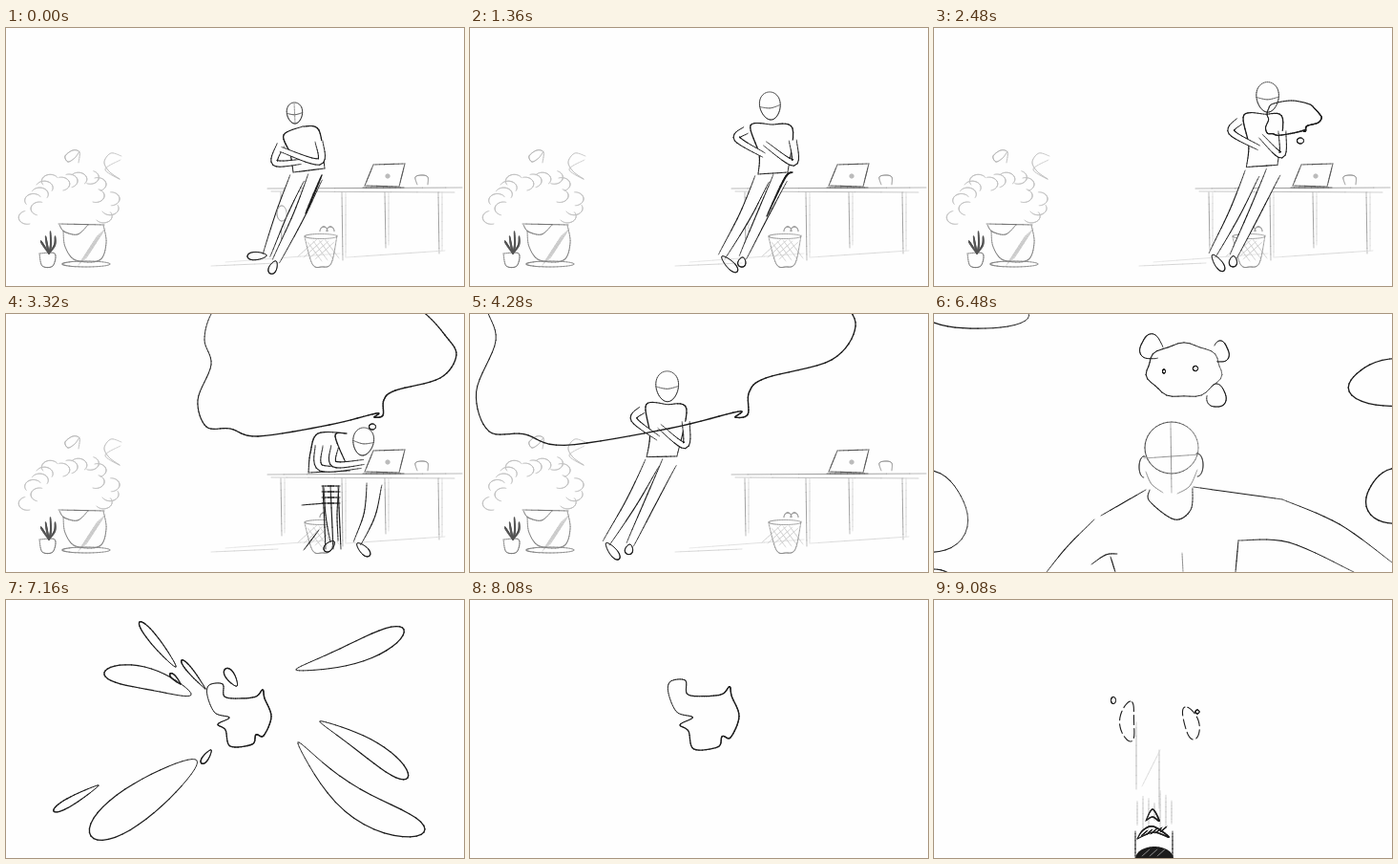
An HTML page with a canvas for the animation above (9.12 s loop, 480 by 270 pixels).

```html
<!DOCTYPE html>
<html lang="en">
<head>
<meta charset="utf-8">
<title>Thought bubble sketch</title>
<style>
html, body { margin: 0; width: 100%; height: 100%; overflow: hidden; background: #fefefe; }
canvas { display: block; width: 100vw; height: 100vh; }
</style>
</head>
<body>
<canvas id="stage"></canvas>
<script>
const LOOP = 9120, INK = '#1c1c1c', PAPER = '#fefefe', TAU = Math.PI * 2;
const canvas = document.getElementById('stage');
const ctx = canvas.getContext('2d');
const ratio = window.devicePixelRatio || 1;
canvas.width = 480 * ratio;
canvas.height = 270 * ratio;

const mix = (a, b, k) => a + (b - a) * k;
const mixPoint = (a, b, k) => [mix(a[0], b[0], k), mix(a[1], b[1], k)];
const ease = k => k * k * (3 - 2 * k);
const range = (n, fn) => Array.from({ length: n }, (_, i) => fn(i));
const random = seed => { const v = Math.sin(seed * 12.9898) * 43758.5453; return v - Math.floor(v); };
const points = text => text.trim().split(/\s+/).map(p => p.split(',').map(Number));

// Smooth line through a few points (Catmull-Rom).
function curve(pts, closed = false) {
  if (typeof pts === 'string') pts = points(pts);
  const n = pts.length, spans = closed ? n : n - 1, steps = 8;
  const at = i => closed ? pts[(i + n) % n] : pts[Math.max(0, Math.min(n - 1, i))];
  return range(spans * steps + 1, s => {
    const i = Math.min(spans - 1, Math.floor(s / steps)), f = s / steps - i;
    const [a, b, c, d] = range(4, k => at(i + k - 1));
    return [0, 1].map(k => b[k] + f / 2 * (c[k] - a[k] + f * (2 * a[k] - 5 * b[k] + 4 * c[k] - d[k]
      + f * (3 * (b[k] - c[k]) + d[k] - a[k]))));
  });
}
// Ellipse or arc, optionally with a wavy edge.
const oval = (x, y, rx, ry, from = 0, to = TAU, wave = 0, lobes = 5) => range(41, i => {
  const a = mix(from, to, i / 40), k = 1 + wave * Math.sin(lobes * a);
  return [x + rx * k * Math.cos(a), y + ry * k * Math.sin(a)];
});
// Drop shape between two points, r0 wide at the first and r1 at the second.
function drop(x0, y0, x1, y1, r0, r1, bend = 0) {
  const len = Math.hypot(x1 - x0, y1 - y0), nx = (y0 - y1) / len, ny = (x1 - x0) / len;
  return range(41, i => {
    const a = i / 40 * TAU, s = (1 - Math.cos(a)) / 2;
    const off = bend * Math.sin(Math.PI * s) + Math.sin(a) * mix(r0, r1, s);
    return [mix(x0, x1, s) + nx * off, mix(y0, y1, s) + ny * off];
  });
}
const zoom = (line, s, cx, cy, dx = 0, dy = 0) => line.map(([x, y]) => [cx + (x - cx) * s + dx, cy + (y - cy) * s + dy]);
const shift = (line, dx, dy = 0) => zoom(line, 1, 0, 0, dx, dy);

function fill(line, color = PAPER) {
  ctx.fillStyle = color;
  ctx.beginPath();
  line.forEach(p => ctx.lineTo(...p));
  ctx.fill();
}
// A pen line that thins out at both ends.
function pen(line, color = INK, width = 1) {
  ctx.strokeStyle = color;
  for (let i = 1; i < line.length; i++) {
    ctx.lineWidth = width * (.6 + .5 * Math.sin(Math.PI * i / line.length));
    ctx.beginPath();
    ctx.moveTo(...line[i - 1]);
    ctx.lineTo(...line[i]);
    ctx.stroke();
  }
}
const seg = (x0, y0, x1, y1, color, width) => pen(curve([[x0, y0], [x1, y1]]), color, width);
const hatch = (n, x, y, stepX, stepY, dx, dy, color, width) => range(n, i =>
  seg(x + i * stepX, y + i * stepY, x + i * stepX + dx, y + i * stepY + dy, color, width));

function track(keys, t, lerp = mix) {
  const i = keys.findIndex(k => k[0] > t);
  if (i < 0) return keys[keys.length - 1][1];
  if (i === 0) return keys[0][1];
  const [t0, a] = keys[i - 1], [t1, b] = keys[i];
  return lerp(a, b, ease((t - t0) / (t1 - t0)));
}

// Room
function desk() {
  seg(274, 168, 478, 167, '#9c9c9c', .9);
  seg(278, 171, 470, 172, '#b4b4b4', .8);
  for (const [x, foot] of [[288, 232], [352, 243], [397, 230], [453, 236]]) {
    seg(x, 172, x + 1, foot, '#a0a0a0', .9);
    seg(x + 4, 172, x + 4, foot - 3, '#cfcfcf', .8);
  }
  seg(215, 249, 285, 246, '#cfcfcf', .8);
  seg(230, 245, 350, 236, '#ddd', .8);
  seg(357, 240, 460, 233, '#d4d4d4', .8);
}
function basket() {
  hatch(4, 316, 224, 6, -1, 15, 20, '#c4c4c4', .7);
  hatch(4, 344, 224, -6, -1, -20, 18, '#c4c4c4', .7);
  pen(oval(330, 218, 17, 2.5), '#999', .8);
  pen(curve('313,219 321,247 331,250 341,246 347,217'), '#8a8a8a', .9);
  range(2, i => pen(oval(333 + i * 7, 213, 4, 5, Math.PI, TAU), '#999', .8));
}
function plant() {
  range(15, i => {
    const a = Math.PI * (.93 + 1.14 * i / 14), reach = 30 + 16 * random(i + 1), turn = random(i + 7) * 2;
    pen(oval(66 + reach * Math.cos(a), 190 + reach * .85 * Math.sin(a), 9, 7, a + turn - 2, a + turn + 1.2), '#c2c2c2', .9);
  });
  pen(curve('76,141 77,130 70,128 62,134 65,140 72,136 77,129'), '#b4b4b4', .9);
  pen(curve('121,134 110,131 103,140 108,150 119,158 104,148 120,138'), '#c2c2c2', .9);
  hatch(5, 104, 210, -2, 7 / 4, -20, 31, '#bbb', .7);
  seg(55, 205, 103, 206, '#777', 1);
  pen(curve('56,206 61,213 75,216 86,206'), '#858585', 1);
  pen(curve('60,212 62,229 73,243 98,243 105,225 102,206'), '#858585', 1);
  pen(oval(84, 247, 25, 3), '#888', 1);
  pen(curve([[35, 236], [38, 249], [49, 249], [51, 236], [35, 236]]), '#777', .9);
  range(4, i => pen(curve([[45, 236], [45 + (i - 1.5) * 4, 227], [44 + (i - 1.5) * 5, 213 + 5 * Math.abs(i - 2)]]), '#555', 2));
}
function deskTop() {
  const screen = points('376,165 385,143 418,142 412,166 376,165');
  fill(screen);
  range(4, i => seg(...screen[i], ...screen[i + 1], '#555', 1));
  seg(374, 167, 417, 167, '#555', 1);
  fill(oval(400, 155, 2.6, 2.6), '#bbb');
  pen(curve('431,164 429,156 436,154 442,156 442,164'), '#999', .9);
}

// Figure: a small set of joints, dressed with limb outlines.
const JOINTS = ['crown', 'chin', 'neck', 'shoulderL', 'back', 'waistL', 'elbowL', 'handL', 'shoulderR', 'waistR', 'elbowR', 'handR',
  'hipL', 'kneeL', 'ankleL', 'toeL', 'hipR', 'kneeR', 'ankleR', 'toeR'];
const lean = points(`302,78 303,100 311,103 291,112 298,132 301,151 282,141 309,140 328,107 334,147 328,140 288,127
  305,157 289,194 273,238 253,239 324,156 307,196 283,244 277,257`);
const arms = points(`313,67 316,96 316,101 294,102 303,132 302,153 280,116 308,133 338,105 333,151 339,141 309,121
  306,158 288,197 264,239 280,255 325,157 306,197 286,240 284,250`);
const sit = points(`376,119 373,148 357,125 327,125 319,145 317,166 330,161 372,159 345,128 360,164 344,157 375,155
  341,181 341,210 344,238 334,248 386,178 381,210 368,240 381,253`);
const slump = points(`216,224 212,256 212,215 190,198 142,202 124,231 217,222 215,252 205,221 165,257 198,238 207,254
  166,250 137,245 108,245 97,249 166,256 178,255 187,253 192,251`);
const leanIn = lean.map(([x, y]) => [x + (250 - y) * .012, y - (250 - y) * .008]);
const stand = arms.map(([x, y]) => [x + (250 - y) * .07, 255 - (255 - y) * 1.1]);
const poses = [[0, lean], [120, lean], [1000, leanIn], [1320, arms], [1400, arms], [1920, stand], [2320, shift(stand, 20)],
  [2880, sit], [3400, sit], [4200, shift(stand, -120, 2)], [4760, slump]];

function limb(joints, wide, narrow) {
  const spine = curve(joints), end = spine.length - 1;
  const side = sign => spine.map(([x, y], i) => {
    const a = spine[Math.max(0, i - 1)], b = spine[Math.min(end, i + 1)];
    const len = Math.hypot(b[0] - a[0], b[1] - a[1]) || 1, w = sign * mix(wide, narrow, i / end) / len;
    return [x - (b[1] - a[1]) * w, y + (b[0] - a[0]) * w];
  });
  const left = side(1), right = side(-1);
  fill([...left, ...right.slice().reverse()]);
  pen(left);
  pen(right);
}
function figure(t) {
  const pose = track(poses, t, (a, b, k) => a.map((p, i) => mixPoint(p, b[i], k)));
  const j = Object.fromEntries(JOINTS.map((name, i) => [name, pose[i]]));
  for (const s of ['R', 'L']) {
    limb([j['hip' + s], j['knee' + s], j['ankle' + s]], 8, 4);
    pen(drop(...j['ankle' + s], ...j['toe' + s], 3, 5));
  }
  const left = curve([j.neck, j.shoulderL, j.back, j.waistL]), right = curve([j.neck, j.shoulderR, j.waistR]);
  fill([...left, ...right.slice().reverse()]);
  pen(left, INK, 1.2);
  pen(right, INK, 1.2);
  if (t < 4400) pen(curve([j.waistL, j.waistR]));
  for (const s of ['L', 'R']) limb([mixPoint(j['shoulder' + s], j['elbow' + s], .35), j['elbow' + s], j['hand' + s]], 4, 2.5);
  const size = Math.hypot(j.chin[0] - j.crown[0], j.chin[1] - j.crown[1]) * .38;
  const head = drop(...j.crown, ...j.chin, size * 1.1, size * .85);
  fill(head);
  pen(head, '#333', .9);
  pen(curve([head[10], mixPoint(j.crown, j.chin, .58), head[30]]), '#555', .7);
  if (t < 1080) {
    pen(curve([j.crown, j.chin]), '#888', .7);
    pen(oval(...j.kneeL, 5, 8), '#999', .7);
    pen(shift(curve([j.hipR, j.kneeR]), 7, -2), INK, 1.8);
  } else if (t < 1480) {
    pen(shift(curve([j.waistR, j.hipR, j.kneeR]), 5), INK, 1.9);
  } else if (t >= 2880 && t < 3480) {
    hatch(4, 331, 180, 0, 6, 19, 0, INK, 1.2);
    hatch(3, 332, 180, 8, 0, 3, 66, INK, 1.1);
    seg(310, 200, 334, 198);
    seg(328, 226, 312, 247);
  }
}

// Thought bubble and its burst
const bubble = curve(`215,0 208,27 215,53 201,90 210,118 235,120 264,128 339,116 388,104 386,108 395,106 396,90 408,80 455,67 472,43
  460,22 440,0 410,-24 325,-40 235,-24`, true);
const bubbleScale = [[2240, .04], [2880, .8], [3280, 1], [3400, 1], [3840, 1.35], [4760, 1.6], [5120, 3]];
const bubbleDrift = [[3400, 0], [4760, -150]];
const crescent = drop(199, 56, 288, 4, 2, 6, -7);

function thought(t) {
  if (t >= 2240 && t < 5120) {
    pen(zoom(bubble, track(bubbleScale, t), 388, 108, track(bubbleDrift, t)), INK, 1.3);
    if (t < 3900) pen(oval(384, 118, 3.5, 3));
  } else if (t >= 5120) {
    const out = Math.max(0, (t - 5160) / 400);
    pen(zoom(crescent, 1 - out * .5, 245, 30, 0, -30 * out));
    pen(shift(curve('0,238 18,256 42,270'), -40 * out, 30 * out), INK, 1.4);
  }
}

// Close-up
const bust = ['222,184 175,211', '168,215 140,243 118,270', '272,181 365,194', '365,194 425,220 480,260', '165,262 180,252 192,251',
  '185,254 190,270', '319,237 372,239 440,270', '319,237 316,270', '226,184 226,196 252,215 269,205 271,182'].map(s => curve(s));
const face = ['248,114 249,187', '220,151 278,147', '222,165 228,178 240,187', '255,188 268,180 276,163', '260,250 261,270'].map(s => curve(s));
const skull = [oval(249, 140, 28, 27), oval(220, 160, 5, 11, 1.6, 5), oval(276, 158, 6, 12, -1.8, 1.6)];
const creature = [oval(262, 59, 39, 28, 0, TAU, .04, 7), oval(228, 35, 12, 13, 1, 6.3, .1, 3), oval(300, 40, 9, 11, -2.4, 2, .1, 3),
  oval(296, 86, 10, 12, -2.2, 3.2, .08, 3), oval(241, 60, 1.5, 2), oval(274, 57, 2.6, 2.6)];
const edges = [oval(46, -1, 53, 17, 0, TAU, .05, 3), oval(486, 73, 51, 25, 0, TAU, .06, 3), oval(485, 192, 32, 29, 0, TAU, .06, 3),
  oval(-7, 209, 42, 43, 0, TAU, .06, 3), oval(0, 285, 24, 18)];

function closeUp(t) {
  const rise = track([[5560, 130], [6040, 0]], t);
  bust.forEach(line => pen(shift(line, 0, rise)));
  skull.forEach(line => pen(shift(line, 0, rise), '#444', .9));
  face.forEach(line => pen(shift(line, 0, rise), '#888', .8));
  const grow = track([[5720, .1], [6200, 1.08], [6440, 1]], t);
  creature.forEach(line => pen(zoom(line, grow, 262, 60)));
  const near = track([[5640, 1.5], [6440, 1]], t);
  edges.forEach(line => pen(zoom(line, near, 240, 135), INK, 1.2));
}

// Pieces flying apart and gathering again
const core = curve(`211,100 213,89 227,88 229,101 245,103 262,101 269,94 271,103 278,122 270,142 262,141 258,151 235,153 230,136
  222,130 234,123 219,118`, true);
const pieces = [[178, 70, 140, 23, 3, 6], [194, 99, 103, 76, 8, 14, 5], [209, 93, 184, 63, 1, 4], [242, 90, 230, 72, 3, 6],
  [183, 88, 172, 77, 1, 3], [304, 73, 417, 31, 5, 16, 5], [329, 127, 421, 186, 4, 14, -4], [306, 149, 438, 243, 6, 22, 16],
  [200, 168, 89, 247, 13, 24], [97, 194, 50, 221, 2, 6], [215, 157, 205, 171, 2, 4]].map(p => drop(...p));
const spread = [[6520, .2], [6760, 1.09], [7000, 1.06], [7160, 1], [7220, 1], [8000, .12]];

function burst(t) {
  pieces.forEach(line => pen(zoom(line, track(spread, t), 245, 120), INK, 1.2));
  pen(zoom(core, track([[6520, 1.3], [7160, 1], [8000, 1.1]], t), 245, 120), INK, 1.3);
}

// Droplets, then the head rushing up
const droplets = [drop(206, 106, 206, 148, 7, 8, 4), drop(263, 112, 273, 146, 7, 8, -2)];
const specks = [oval(188, 105, 2.5, 3.5), oval(276, 117, 2, 2)];

function drops(s) {
  ctx.strokeStyle = INK;
  ctx.lineWidth = 1.1;
  ctx.setLineDash([10, 4]);
  for (const line of droplets) {
    ctx.beginPath();
    zoom(line, s, 235, 126).forEach(p => ctx.lineTo(...p));
    ctx.stroke();
  }
  ctx.setLineDash([]);
  specks.forEach(line => pen(zoom(line, s, 235, 126)));
}
function rush() {
  seg(212, 128, 212, 198, '#b0b0b0', .8);
  seg(236, 157, 236, 218, '#b0b0b0', .8);
  seg(237, 157, 218, 195, '#d0d0d0', .7);
  range(7, i => seg(213 + i * 6, 195 + 28 * random(i + 3), 213 + i * 6, 228 + 14 * random(i + 9), '#bbb', .8));
  drops(1);
  pen(curve([[222, 231], [229, 219], [236, 231], [229, 227], [222, 231]]), INK, 1.5);
  pen(curve('213,250 219,241 230,237 246,248 230,243 213,250'), INK, 1.6);
  hatch(5, 217, 247, 5, -1, 7, -6, INK, 1.2);
  range(2, i => seg(211 + i * 39, 242, 211 + i * 39, 270));
  fill(oval(231, 271, 20, 13, Math.PI, TAU), INK);
  hatch(3, 218, 268, 8, 0, 8, -7, '#aaa', .6);
}
function finale(t) {
  if (t >= 9080) rush();
  else if (t < 8520) pen(zoom(core, track([[8000, 1.1], [8200, 1.15], [8520, .35]], t), 240, 125), INK, 1.3);
  else drops(track([[8520, .3], [8960, 1]], t));
}

// Drawn on twos, with two short holds.
function onTwos(t) {
  if (t < 120) return 0;
  if (t >= 7000 && t < 7160) return 7000;
  if (t >= 8960 && t < 9080) return 8960;
  return Math.floor((t - 40) / 80) * 80 + 40;
}
function render(t) {
  ctx.setTransform(canvas.width / 480, 0, 0, canvas.height / 270, 0, 0);
  ctx.lineCap = ctx.lineJoin = 'round';
  ctx.fillStyle = PAPER;
  ctx.fillRect(0, 0, 480, 270);
  if (t < 5560) [desk, basket, plant, figure, deskTop, thought].forEach(part => part(t));
  else if (t < 6520) closeUp(t);
  else if (t < 8000) burst(t);
  else finale(t);
}
const start = performance.now();
let shown = -1;
function tick() {
  const t = onTwos((performance.now() - start) % LOOP);
  if (t !== shown) render(shown = t);
  requestAnimationFrame(tick);
}
tick();
</script>
</body>
</html>
```
